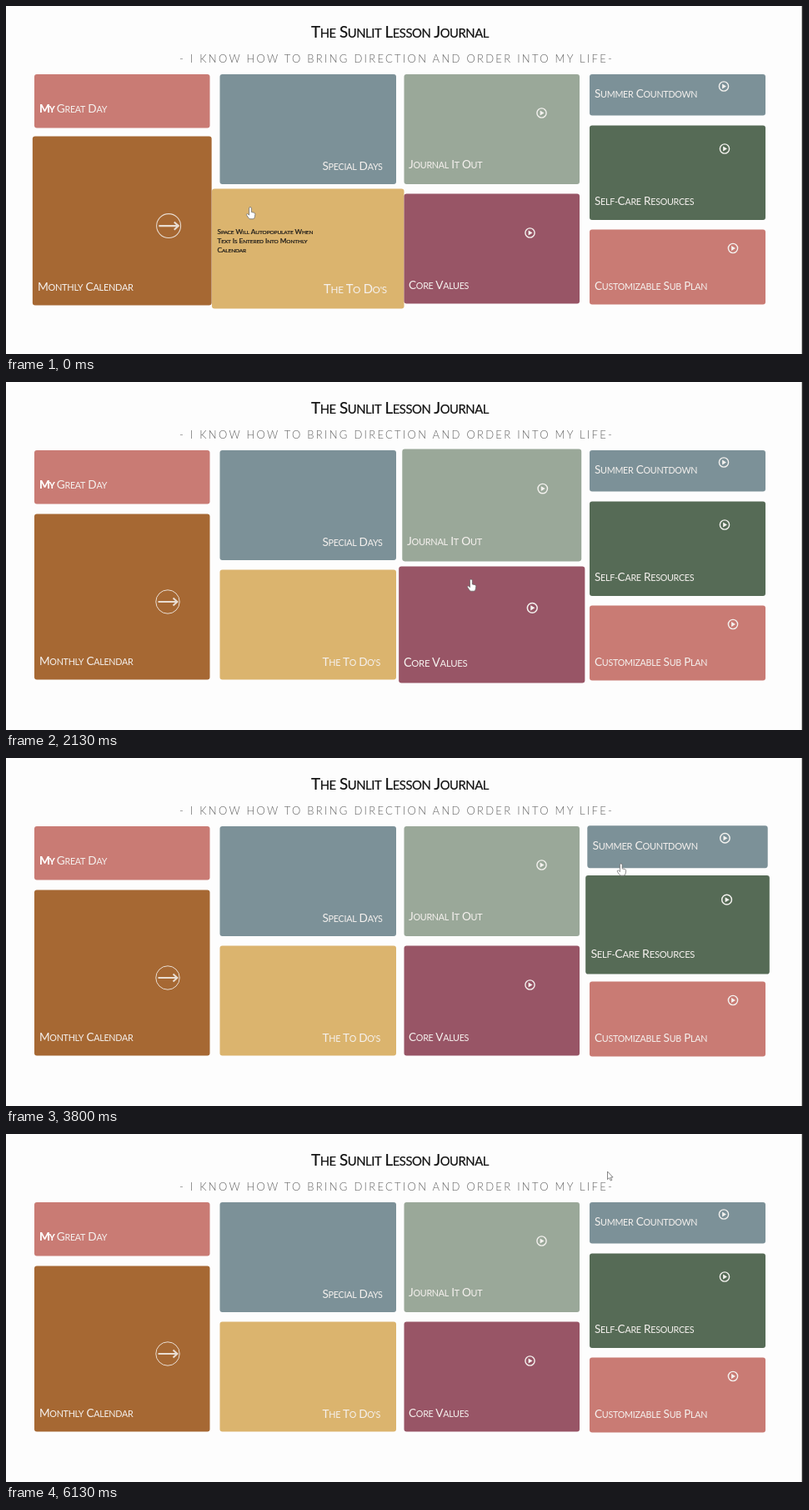
An HTML page for the animation above (6.2 s loop, 956 by 418 pixels).

```html
<!DOCTYPE html>
<html lang="en">
<head>
<meta charset="utf-8">
<title>Planner dashboard</title>
<style>
  html, body { margin: 0; width: 100%; height: 100%; overflow: hidden; background: #fdfdfd; }
  svg { display: block; width: 100%; height: 100%; }
  text { font-family: Lato, "Open Sans", sans-serif; white-space: pre; }
  .title { font-size: 18.8px; letter-spacing: -.46px; text-anchor: middle; fill: #111; stroke: #111; stroke-width: .2; }
  .motto { font-size: 13px; font-weight: 300; letter-spacing: 2.28px; text-anchor: middle; fill: #626262; }
  .label { font-size: 13.6px; letter-spacing: -.28px; fill: #f5f1ee; }
  .note { font-size: 7.6px; letter-spacing: -.1px; fill: #1c1a18; stroke: #1c1a18; stroke-width: .2; }
  .bold { font-weight: 800; letter-spacing: -1.2px; fill: #fff; }
  .icon { fill: none; stroke: #f4f2ef; stroke-width: 1.4; }
  .icon .solid { fill: #f4f2ef; stroke: none; }
  .arrow { stroke: #e9ddd2; stroke-width: 1; }
  .cursor path { fill: #fff; stroke: #666; stroke-width: .8; stroke-linejoin: round; }
</style>
</head>
<body>
<svg id="stage" viewBox="0 0 956 418"></svg>
<script>
const LOOP = 6200, STEP = 1000 / 15, FADE = 330, GROWTH = .1;

// hover: [enter, leave] in ms; icon: play button centre
const cards = [
  { box: [34, 82, 210.5, 64.5], color: '#c97b74', label: 'Great Day', at: [40, 127.5], lead: 'My' },
  { box: [34, 158.5, 210.5, 199], color: '#a66833', label: 'Monthly Calendar', at: [40, 340], arrow: [194, 264], hover: [-700, -165] },
  { box: [256.5, 82, 211.5, 132], color: '#7c9198', label: 'Special Days', at: [379.5, 197], note: true, hover: [474, 1409] },
  { box: [256.5, 225.5, 211.5, 132], color: '#dbb46e', label: "The To Do's", at: [379.5, 341], note: true, hover: [-209, 409] },
  { box: [477.5, 82, 210.5, 132], color: '#9aa899', label: 'Journal It Out', at: [483, 195], icon: [642.5, 128.5], hover: [1411, 1971] },
  { box: [477.5, 225.5, 210.5, 132], color: '#985566', label: 'Core Values', at: [483, 339.5], icon: [628.5, 272.5], hover: [2024, 2700] },
  { box: [700, 82, 211, 49.5], color: '#7c9198', label: 'Summer Countdown', at: [706, 110], icon: [861, 96.5], hover: [3760, 4202] },
  { box: [700, 143.5, 211, 113.5], color: '#566b56', label: 'Self-Care Resources', at: [706, 238.5], icon: [862, 171.5], hover: [3180, 3705] },
  { box: [700, 268.5, 211, 90], color: '#c97b74', label: 'Customizable Sub Plan', at: [706, 340.5], icon: [872, 291], hover: [2740, 3125] }
];

// Pointer tip: [ms, x, y]
const route = [
  [0, 293, 242], [300, 325, 236], [430, 345, 216], [530, 352.5, 206], [750, 358, 192],
  [1200, 375, 190], [1405, 475, 186], [1530, 512, 184], [1750, 535, 195], [1990, 552, 221],
  [2130, 557.5, 237], [2450, 595, 275], [2700, 694, 292], [2850, 728, 300], [3130, 741, 261],
  [3400, 741, 215], [3705, 740, 138], [4000, 733, 105], [4200, 727, 78], [4350, 721.5, 45]
];

const noteLines = ['Space Will Autopopulate When', 'Text Is Entered Into Monthly', 'Calendar'];

const smallCaps = s => s.replace(/[^A-Z ]+/g, m => `<tspan font-size=".79em">${m.toUpperCase()}</tspan>`);
const text = (cls, x, y, body) => `<text class="${cls}" x="${x}" y="${y}">${body}</text>`;

const playIcon = ([x, y]) => `<g class="icon" transform="translate(${x} ${y})">
  <circle r="5.6"/><path class="solid" d="M-1.9-2.9L3 0L-1.9 2.9z"/></g>`;

const arrowIcon = ([x, y]) => `<g class="icon arrow" transform="translate(${x} ${y})">
  <circle r="14.2"/><path stroke-width="2" d="M-11.5 0H11.5M6.5-4.5L11.5 0L6.5 4.5"/></g>`;

function cardMarkup(card) {
  const [x, y, w, h] = card.box;
  const lead = card.lead ? `<tspan class="bold">${smallCaps(card.lead)}</tspan> ` : '';
  const note = card.note
    ? `<g class="hint">${noteLines.map((line, i) =>
        text('note', 262.5, y + h / 2 - 15.8 + i * 10.1, smallCaps(line))).join('')}</g>`
    : '';
  return `<g class="card"><rect x="${x}" y="${y}" width="${w}" height="${h}" rx="3" fill="${card.color}"/>
    ${text('label', ...card.at, lead + smallCaps(card.label))}${note}
    ${card.icon ? playIcon(card.icon) : ''}${card.arrow ? arrowIcon(card.arrow) : ''}</g>`;
}

const stage = document.getElementById('stage');
stage.innerHTML = `
  <rect width="956" height="418" fill="#fdfdfd"/>
  <rect x="954.7" width="1.3" height="418" fill="#222"/>
  ${text('title', 472.5, 37.5, smallCaps('The Sunlit Lesson Journal'))}
  ${text('motto', 468.5, 67.7, '-\u00a0I KNOW HOW TO BRING DIRECTION AND ORDER INTO MY LIFE-')}
  ${cards.map(cardMarkup).join('')}
  <g class="cursor">
    <path id="hand" transform="scale(.92)" d="M-1.5 1Q-1.5-.5 0-.5T1.5 1V6L5 6.8Q6.6 7.2 6.4 9L5.8 12.5Q5.4 15 3.5 15H0Q-1.2 15-2 14L-4.6 10.2Q-5.3 9-4.4 8.4Q-3.4 8-2.5 9L-1.5 10z"/>
    <path id="pointer" d="M0 0V9.6L2.2 7.6L3.8 11L5.3 10.3L3.8 7H6.6z"/>
  </g>`;

const groups = [...stage.querySelectorAll('.card')];
const cursor = stage.querySelector('.cursor');
const hand = document.getElementById('hand');
const pointer = document.getElementById('pointer');

const clamp = v => Math.min(1, Math.max(0, v));
const ease = v => 1 - (1 - clamp(v)) ** 2.3;
const show = (el, on) => el.setAttribute('visibility', on ? 'visible' : 'hidden');

function tipAt(t) {
  const i = route.findIndex(p => p[0] > t);
  if (i < 0) return route.at(-1).slice(1);
  const a = route[i - 1], b = route[i], k = (t - a[0]) / (b[0] - a[0]);
  return [a[1] + (b[1] - a[1]) * k, a[2] + (b[2] - a[2]) * k];
}

function draw(t) {
  let hovering = false;
  cards.forEach(({ box: [x, y, w, h], hover, note }, i) => {
    if (!hover) return;
    const [enter, leave] = hover;
    const active = t >= enter && t < leave;
    const scale = 1 + GROWTH * (ease((t - enter) / FADE) - ease((t - leave) / FADE));
    const cx = x + w / 2, cy = y + h / 2;
    groups[i].setAttribute('transform', `translate(${cx} ${cy}) scale(${scale}) translate(${-cx} ${-cy})`);
    if (note) show(groups[i].querySelector('.hint'), active);
    hovering ||= active;
  });
  cursor.setAttribute('transform', `translate(${tipAt(t)})`);
  show(hand, hovering);
  show(pointer, !hovering);
}

const start = performance.now();
function tick() {
  const t = (performance.now() - start) % LOOP;
  draw(Math.floor((t + 7) / STEP) * STEP);
  requestAnimationFrame(tick);
}
tick();
</script>
</body>
</html>
```
